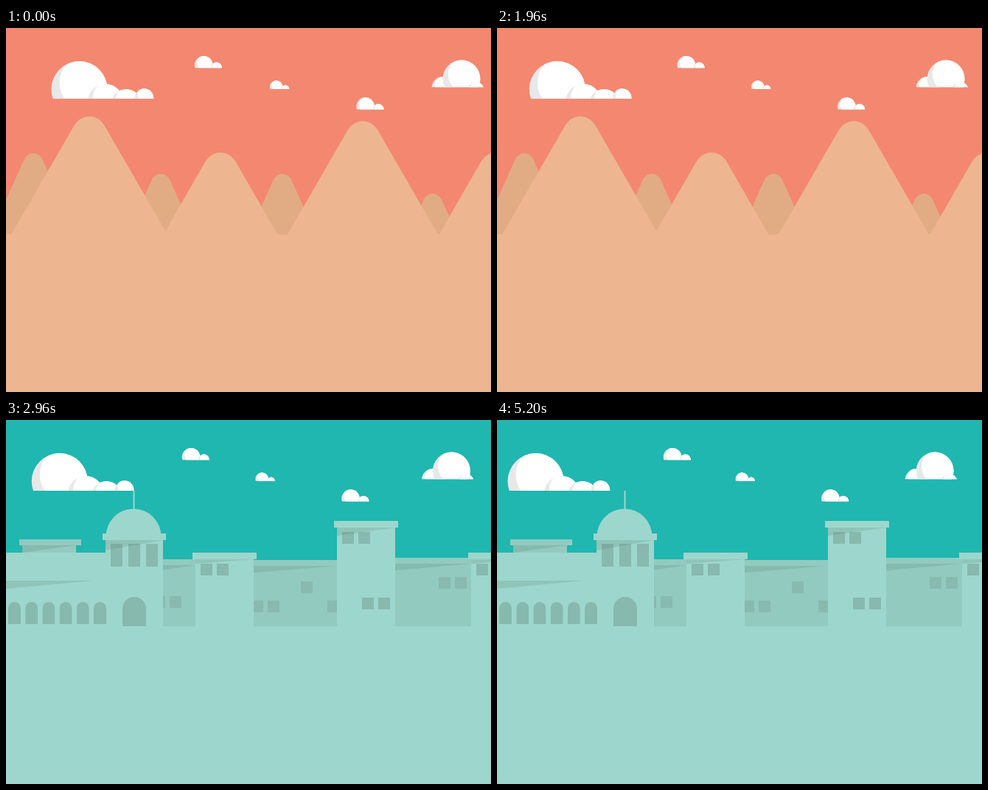
These frames come from a looping animation (658x494 px, 5240 ms). An HTML page with a canvas:

```html
<!DOCTYPE html>
<html>
<head>
<meta charset="utf-8">
<style>
  html, body { margin: 0; height: 100%; overflow: hidden; }
  canvas { display: block; }
</style>
</head>
<body>
<canvas width="658" height="494"></canvas>
<script>
const ctx = document.querySelector('canvas').getContext('2d');
const W = 658, H = 494, LOOP = 5240, STEP = 40, HORIZON = 280;
const MORPH = 2040, DETAIL = 2280, REPEAT = 374;
let now = 0;

const lerp = (a, b, p) => a + (b - a) * p;
const ramp = (start, dur) => Math.min(1, Math.max(0, (now - start) / dur));
const smooth = p => p * p * (3 - 2 * p);
const blend = (a, b, p) => `rgb(${a.map((v, i) => Math.round(lerp(v, b[i], p)))})`;
const ink = alpha => `rgba(73,98,81,${alpha})`;

// A round-topped mountain at x that squares off into a wall from l to r.
function mound(x, top, half, slope, l, r, roof, delay = 0) {
  const p = smooth(ramp(MORPH + delay, 500));
  const corner = top + half * .6;
  const spread = half + (HORIZON - corner) / slope;
  const left = lerp(x - half, l, p), right = lerp(x + half, r, p);
  const y = lerp(corner, roof, p);
  const rise = half * .8 * (1 - p), dx = rise * .6;
  ctx.beginPath();
  ctx.moveTo(lerp(x - spread, l, p), HORIZON + 1);
  ctx.lineTo(left, y);
  ctx.bezierCurveTo(left + dx, y - rise, right - dx, y - rise, right, y);
  ctx.lineTo(lerp(x + spread, r, p), HORIZON + 1);
  ctx.fill();
}

function cap(l, r, y, h) {
  const mid = (l + r) / 2, reach = ((r - l) / 2 + 4) * smooth(ramp(2400, 200));
  ctx.fillRect(mid - reach, y, reach * 2, h);
}

function wedge(l, r, y, depth) {
  ctx.fillStyle = ink(.16 * ramp(2320, 280));
  ctx.beginPath();
  ctx.moveTo(l, y);
  ctx.lineTo(r, y);
  ctx.lineTo(l, y + depth);
  ctx.fill();
}

// Windows open upward, one after another.
function row(x, y, count, order = 0, h = 16, pitch = 22) {
  for (let i = 0; i < count; i++) {
    const grown = h * ramp(DETAIL + (order + i) * 80, 160);
    ctx.fillRect(x + i * pitch, y + h - grown, 16, grown);
  }
}

function arch(x, bottom, w, h, start) {
  const grown = h * ramp(start, 160), r = w / 2;
  ctx.save();
  ctx.beginPath();
  ctx.rect(x, bottom - grown, w, grown);
  ctx.clip();
  ctx.beginPath();
  ctx.arc(x + r, bottom - h + r, r, Math.PI, 0);
  ctx.lineTo(x + w, bottom);
  ctx.lineTo(x, bottom);
  ctx.fill();
  ctx.restore();
}

function backHouse(color, x, top, l, r, roof) {
  ctx.fillStyle = color;
  mound(x, top, 11.7, 2.2, l, r, roof, (x / 46) ** 2);
  wedge(l, r, roof + 8, 10);
}

function tower(color, x, top, l, r, roof, depth) {
  ctx.fillStyle = color;
  mound(x, top, 20.5, 1.72, l, r, roof - 2);
  cap(l, r, roof - 9, 9);
  wedge(l, r, roof, depth);
}

function dome(x, y) {
  const tip = 25 * ramp(2640, 140);
  ctx.beginPath();
  ctx.arc(x, y, 37.5 * smooth(ramp(2480, 220)), Math.PI, 0);
  ctx.fill();
  ctx.fillRect(x - .5, y - 37 - tip, 2, tip);
}

function disc(x, y, r, color) {
  ctx.fillStyle = color;
  ctx.beginPath();
  ctx.arc(x, y, r, 0, 7);
  ctx.fill();
}

// Puffs are [x, y, radius] from the left end of the flat base.
function cloud(x, base, speed, puffs, scale = 1) {
  ctx.save();
  ctx.translate(x - speed * now / 1000, base);
  ctx.scale(scale, scale);
  ctx.beginPath();
  ctx.rect(-5, -60, 160, 60);
  ctx.clip();
  for (const [px, py, r] of puffs) {
    ctx.save();
    disc(px, py, r, '#e8e8e8');
    ctx.clip();
    disc(px + r * .29, py - r * .23, r, '#fff');
    ctx.restore();
  }
  ctx.restore();
}

function drawBack(color) {
  backHouse(color, 37, 170, 22, 95, 162);
  ctx.fillStyle = color;
  cap(22, 98, 162, 8);
  backHouse(color, 210, 198, 190, 257, 189);
  backHouse(color, 375, 198, 326, 449, 190);
  backHouse(color, 579, 225, 520, 631, 187);
  ctx.fillStyle = ink(.15);
  row(200, 239, 2, 2);
  row(333, 245, 2, 2);
  row(400, 219, 1, 2);
  row(436, 245, 1, 4);
  row(587, 213, 2, 2);
}

function drawFront(color) {
  ctx.fillStyle = color;
  ctx.fillRect(0, HORIZON, W, H - HORIZON);
  mound(291 - REPEAT, 169, 20.5, 1.72, -60, 14, 182);
  const grow = ramp(DETAIL, 340);
  ctx.fillRect(136 - 136 * grow, 180, 136 * grow, 101 * grow ** .7);

  tower(color, 113, 120, 135, 213, 163, 14);
  ctx.fillStyle = color;
  dome(173, 158);
  tower(color, 484, 126.5, 449, 528, 146, 11);
  for (const dx of [0, REPEAT]) tower(color, 291 + dx, 169, 257 + dx, 336 + dx, 189, 6);
  wedge(0, 118, 218, 11);

  ctx.fillStyle = ink(.25);
  row(142, 168, 3, 0, 31, 24);
  row(456, 152, 2);
  row(483, 241, 2, 2);
  row(264, 195, 2);
  row(264 + REPEAT, 195, 2);
  for (let i = 0; i < 6; i++) arch(119 - 23.2 * i, 277, 17, 30, DETAIL + 80 * i);
  arch(158, 280, 32, 40, DETAIL + 40);
}

function drawClouds() {
  const pair = [[12.2, -4, 12.3], [29.5, 0, 7.6]];
  cloud(61, 96, 9.04, [[38.5, -13, 38], [74, 4, 24], [102, 7, 20], [126.5, -1, 12.7]]);
  cloud(256, 54.2, 5.8, pair);
  cloud(358, 82.8, 6.6, pair, .71);
  cloud(475.5, 110.6, 6.8, pair);
  cloud(577.5, 80.3, 4.6, [[15, 1, 15], [40.5, -11.3, 25.4], [60, 4, 11]]);
}

function draw() {
  const p = smooth(ramp(MORPH, 500));
  ctx.fillStyle = blend([244, 135, 111], [31, 183, 176], smooth(ramp(MORPH, 590)));
  ctx.fillRect(0, 0, W, H);
  drawBack(blend([225, 172, 132], [147, 202, 192], p));
  drawFront(blend([237, 182, 144], [157, 214, 205], p));
  drawClouds();
}

function tick() {
  now = Math.floor(performance.now() % LOOP / STEP) * STEP;
  draw();
  requestAnimationFrame(tick);
}
tick();
</script>
</body>
</html>
```
